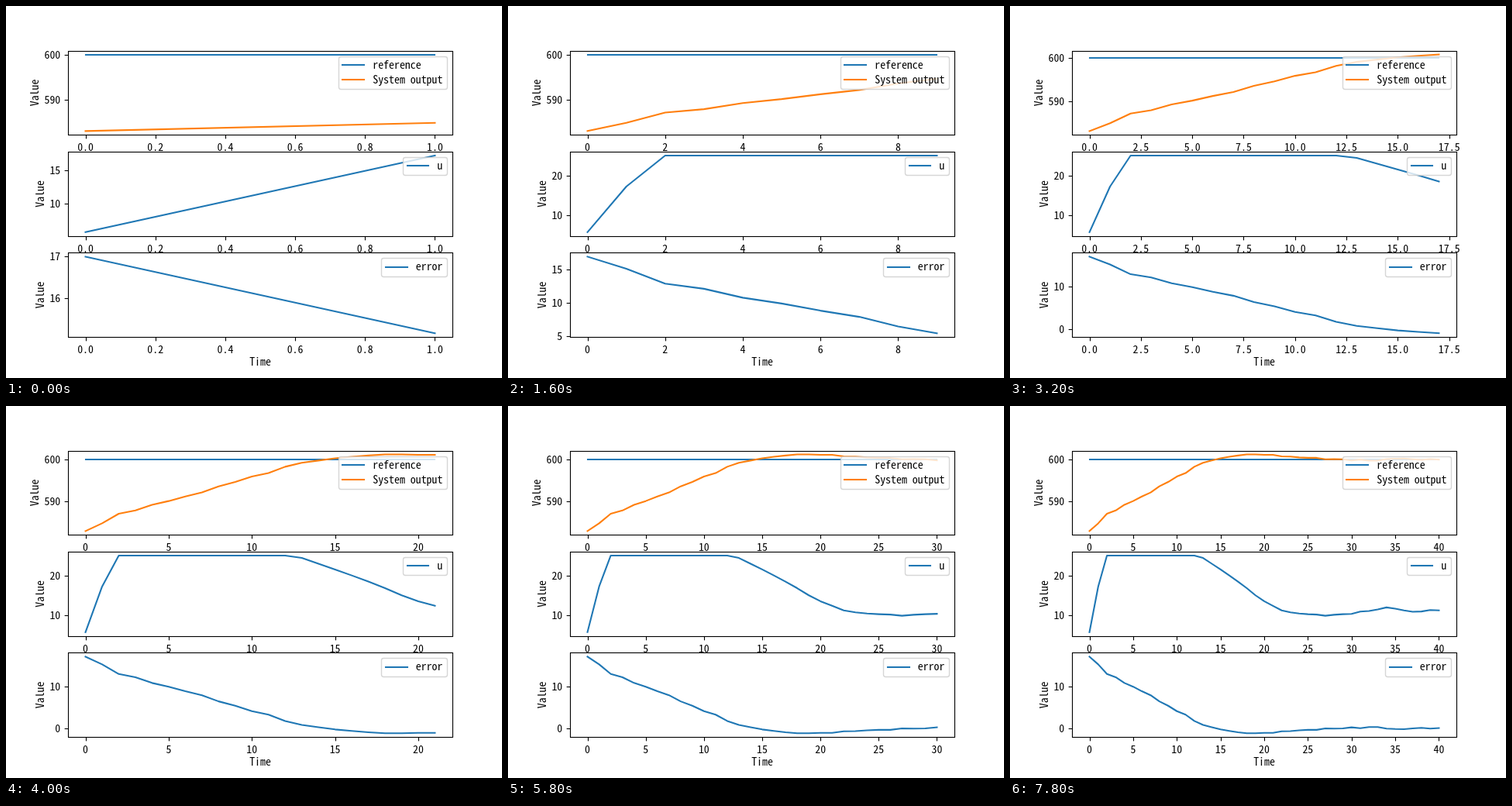
Write an HTML page with a canvas that moves like this. It is 640 px wide and 480 px high and loops after 8000 ms.

```html
<!DOCTYPE html>
<html lang="en">
<head>
<meta charset="utf-8">
<title>Control loop response</title>
<style>
  html, body { margin: 0; width: 100%; height: 100%; overflow: hidden; background: #fff; }
  canvas { display: block; width: 640px; height: 480px; }
</style>
</head>
<body>
<canvas id="stage" width="640" height="480"></canvas>
<script>
const ctx = document.getElementById('stage').getContext('2d');

const BLUE = '#1f77b4', ORANGE = '#ff7f0e';
const PT = 100 / 72, EM = 10 * PT, CHAR = EM / 2;
const LEFT = 80, RIGHT = 576, HEIGHT = 369.6 / 3.4, PITCH = HEIGHT * 1.2;
const TICK = 3.5 * PT, LINE = 1.5 * PT, DASH = [3.7 * LINE, 1.6 * LINE];
const STEP_MS = 200, STEPS = 40;

const error = [
  16.99, 15.17, 12.9, 12.13, 10.78, 9.9, 8.82, 7.88, 6.43, 5.4, 4.12, 3.3, 1.8, 0.87,
  0.33, -0.2, -0.55, -0.86, -1.1, -1.1, -1.02, -1.02, -0.65, -0.6, -0.4, -0.3, -0.3,
  0.05, 0, 0.05, 0.3, 0.1, 0.37, 0.37, 0, -0.1, -0.14, 0.03, 0.17, 0, 0.12
];
const output = error.map(e => 600 - e);
const reference = error.map(() => 600);
const control = [
  5.72, 17.2, ...Array(11).fill(25), 24.4, 22.95, 21.5, 20, 18.45, 16.8, 15, 13.5,
  12.35, 11.2, 10.7, 10.4, 10.25, 10.15, 9.85, 10.1, 10.25, 10.33, 10.9, 11.05, 11.45,
  11.95, 11.65, 11.2, 10.85, 10.93, 11.3, 11.2
];

const plots = [
  [{ name: 'reference', data: reference, color: BLUE, solid: true },
   { name: 'System output', data: output, color: ORANGE }],
  [{ name: 'u', data: control, color: BLUE }],
  [{ name: 'error', data: error, color: BLUE }]
];

// Font size chosen so that one character advances half an em of the plot font.
const FAMILY = '"Noto Sans Mono CJK SC", "Noto Sans Mono", "DejaVu Sans Mono", monospace';
ctx.font = `100px ${FAMILY}`;
const FONT = `${CHAR * 100 / ctx.measureText('0').width}px ${FAMILY}`;

const crisp = v => Math.floor(v + 0.5) + 0.5;

function text(str, x, y, align = 'left') {
  ctx.fillStyle = '#000';
  ctx.textAlign = align;
  ctx.fillText(str, x, Math.round(y));
}

function stroke(points, color, width, solid = true) {
  ctx.beginPath();
  points.forEach(([x, y]) => ctx.lineTo(x, y));
  ctx.strokeStyle = color;
  ctx.lineWidth = width;
  ctx.lineJoin = 'round';
  ctx.lineCap = solid && width === LINE ? 'square' : 'butt';
  ctx.setLineDash(solid ? [] : DASH);
  ctx.stroke();
}

// Round tick values: the smallest nice step within maxBins, finer if under two ticks fit.
function ticks(lo, hi, maxBins) {
  const raw = (hi - lo) / maxBins;
  const steps = [];
  for (let p = -2; p <= 2; p++) for (const m of [1, 2, 2.5, 5]) steps.push(m * 10 ** p);
  let i = steps.findIndex(s => s >= raw - 1e-9);
  for (;; i--) {
    const step = steps[i], values = [];
    for (let k = Math.ceil(lo / step - 1e-9); k * step <= hi + 1e-9; k++) values.push(k * step);
    if (values.length < 2 && i > 0) continue;
    const digits = [0, 1, 2, 3].find(d => Math.abs(step - +step.toFixed(d)) < 1e-9);
    return values.map(v => ({ v, label: v.toFixed(digits) }));
  }
}

function legend(series, top) {
  const chars = Math.max(...series.map(s => s.name.length));
  const pad = 0.4 * EM, right = RIGHT - EM / 2, y0 = top + EM / 2;
  const x0 = right - 2 * pad - 2.8 * EM - chars * CHAR;
  const bottom = y0 + 2 * pad + 12.1 + 19 * (series.length - 1);
  const x = crisp(x0), y = crisp(y0);
  ctx.globalAlpha = 0.8;
  ctx.beginPath();
  ctx.roundRect(x, y, crisp(right) - x, crisp(bottom) - y, 0.2 * EM);
  ctx.fillStyle = '#fff';
  ctx.fill();
  ctx.strokeStyle = '#ccc';
  ctx.lineWidth = PT;
  ctx.setLineDash([]);
  ctx.stroke();
  ctx.globalAlpha = 1;
  series.forEach((s, row) => {
    const base = y0 + pad + 10.4 + 19 * row, mid = Math.round(base - 0.35 * EM);
    const start = Math.round(x0 + pad), end = Math.round(x0 + pad + 2 * EM);
    stroke([[start, mid], [end, mid]], s.color, LINE, s.solid);
    text(s.name, x0 + pad + 2.8 * EM, base);
  });
}

function plot(series, index, last) {
  const top = 57.6 + index * PITCH, bottom = top + HEIGHT;
  const shown = series.flatMap(s => s.data.slice(0, last + 1));
  const min = Math.min(...shown), max = Math.max(...shown), margin = (max - min) * 0.05;
  const lo = min - margin, hi = max + margin;
  const px = v => LEFT + (RIGHT - LEFT) * (v / last + 0.05) / 1.1;
  const py = v => bottom - HEIGHT * (v - lo) / (hi - lo);
  const [l, r, t, b] = [LEFT, RIGHT, top, bottom].map(crisp);

  ctx.fillStyle = '#fff';
  ctx.fillRect(l, t, r - l, b - t);

  for (const { v, label } of ticks(-0.05 * last, 1.05 * last, 9)) {
    const x = crisp(px(v));
    stroke([[x, b], [x, b + TICK]], '#000', 0.8 * PT);
    text(label, px(v), bottom + 20.8, 'center');
  }
  const yTicks = ticks(lo, hi, 3);
  for (const { v, label } of yTicks) {
    const y = crisp(py(v));
    stroke([[l, y], [l - TICK, y]], '#000', 0.8 * PT);
    text(label, LEFT - 2 * TICK, py(v) + 5, 'right');
  }

  for (const s of series) {
    const points = s.solid
      ? [0, last].map(i => [Math.round(px(i)), Math.round(py(s.data[i]))])
      : s.data.slice(0, last + 1).map((v, i) => [px(i), py(v)]);
    stroke(points, s.color, LINE, s.solid);
  }
  ctx.lineCap = 'butt';
  ctx.lineJoin = 'miter';
  ctx.setLineDash([]);
  ctx.strokeStyle = '#000';
  ctx.lineWidth = 0.8 * PT;
  ctx.strokeRect(l, t, r - l, b - t);

  const labelWidth = CHAR * Math.max(...yTicks.map(k => k.label.length));
  ctx.save();
  ctx.translate(Math.round(LEFT - 2 * TICK - labelWidth - 4 * PT - 1.5), (top + bottom) / 2);
  ctx.rotate(-Math.PI / 2);
  text('Value', 0, 0, 'center');
  ctx.restore();

  legend(series, top);
}

let drawn = 0;
function frame(now) {
  const last = Math.floor(now / STEP_MS) % STEPS + 1;
  if (last !== drawn) {
    drawn = last;
    ctx.fillStyle = '#fff';
    ctx.fillRect(0, 0, 640, 480);
    ctx.font = FONT;
    plots.forEach((series, i) => plot(series, i, last));
    text('Time', (LEFT + RIGHT) / 2, 464, 'center');
  }
  requestAnimationFrame(t => frame(Math.max(0, t - start)));
}
const start = performance.now();
frame(0);
</script>
</body>
</html>
```
